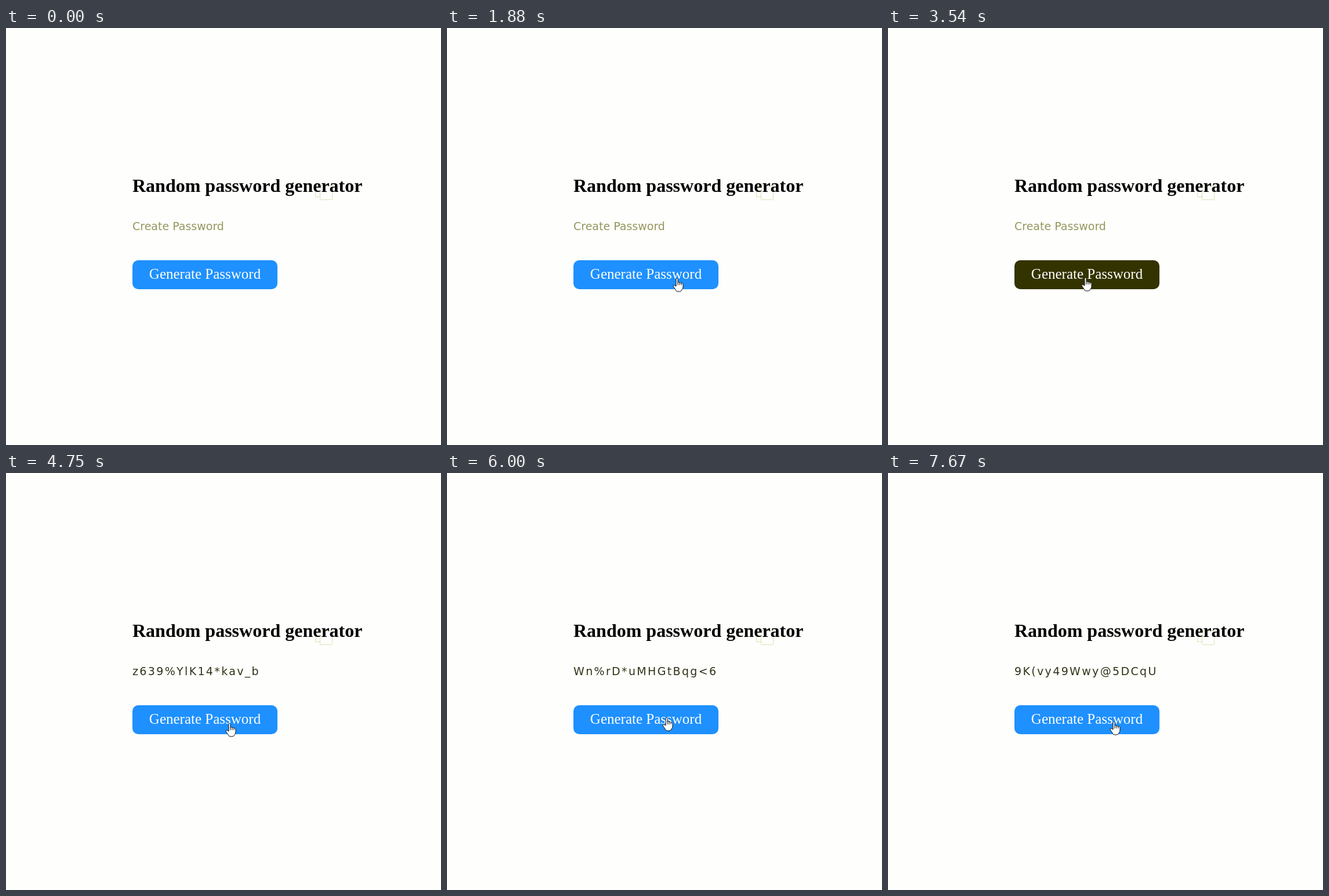
An HTML page that plays this animation: 750x720 px, repeating every 8 s.

```html
<!DOCTYPE html>
<html lang="en">
<head>
<meta charset="utf-8">
<title>Random password generator</title>
<style>
  html, body { margin: 0; width: 100%; height: 100%; overflow: hidden; background: #fefefc; }
  svg { display: block; width: 100%; height: 100%; }
  .title { font: bold 32px "Liberation Serif", "Times New Roman", serif; }
  .label { font: 25px "Liberation Serif", "Times New Roman", serif; text-anchor: middle; }
  #field { font: 19px "DejaVu Sans", Verdana, sans-serif; fill: #96965f; }
  #field.filled { fill: #333318; letter-spacing: 2.35px; }
  .ghost { fill: none; stroke: #e0e0b4; }
  .cursor { fill: #fff; stroke: #111; stroke-linejoin: round; }
</style>
</head>
<body>
<svg viewBox="0 0 750 720">
  <rect width="750" height="720" fill="#fefefc"/>
  <g class="ghost">
    <path d="M541 281.5H533.5V291.5H541"/>
    <rect x="541.5" y="272.5" width="21" height="24" rx="1"/>
  </g>
  <text class="title" x="218" y="283">Random password generator</text>
  <text id="field" x="218" y="349"></text>
  <rect id="button" x="218" y="401" width="250" height="50" rx="10"/>
  <text class="label" x="343" y="433" fill="#fffffa">Generate Password</text>
  <g id="pointer" class="cursor">
    <path id="arrow" d="M0 0V16.5L4 13L6 19L9 18L6 12H11.5Z"/>
    <g id="hand">
      <path d="M-2 14V1.5Q-.5-1.5 1 1.5V8Q2.5 5.500 4 8Q5.500 6 7 9Q10 7.500 10 11V15Q10 18 8 20
               Q7 23 4 23H1Q-2 23 -3 20Q-4 18 -7 14Q-7 10 -2 14Z"/>
      <path fill="none" d="M1 8V12M4 8V12M7 9V12"/>
    </g>
  </g>
</svg>
<script>
const LOOP = 8000, ENTER = 250, HOP = 700, PRESS = 120;
const $ = id => document.getElementById(id);
const [field, button, pointer, arrow, hand] =
  ['field', 'button', 'pointer', 'arrow', 'hand'].map($);

// Where the pointer arrives, and the password made if it presses there
const start = { x: 84, y: 512 };
const stops = [
  { at: 1040, x: 300, y: 484 },
  { at: 1880, x: 397, y: 432 },
  { at: 2590, x: 350, y: 462 },
  { at: 3500, x: 341, y: 431, word: 'z639%YlK14*kav_b' },
  { at: 4740, x: 386, y: 432 },
  { at: 5380, x: 371, y: 418, word: 'Wn%rD*uMHGtBqg<6' },
  { at: 6400, x: 390, y: 429, word: '1*QY6_iz#qeqOp_u' },
  { at: 7340, x: 390, y: 429, word: '9K(vy49Wwy@5DCqU' }
];
const clicks = stops.filter(s => s.word);

function ease(u) {
  u = Math.min(1, Math.max(0, u));
  return u * u * (3 - 2 * u);
}

function pointAt(t) {
  let { x, y } = start;
  for (const s of stops) {
    const e = ease((t - s.at) / HOP + 1);
    x += (s.x - x) * e;
    y += (s.y - y) * e;
  }
  return [Math.round(x), Math.round(y)];
}

function show(node, on) {
  node.setAttribute('visibility', on ? 'visible' : 'hidden');
}

function draw(t) {
  const made = clicks.filter(c => t >= c.at + PRESS).pop();
  field.textContent = made ? made.word : 'Create Password';
  field.classList.toggle('filled', Boolean(made));

  const pressed = clicks.some(c => t >= c.at && t < c.at + PRESS);
  button.setAttribute('fill', pressed ? '#333300' : '#1e90ff');

  const [x, y] = pointAt(t);
  const over = x >= 218 && x < 468 && y >= 401 && y < 451;
  pointer.setAttribute('transform', `translate(${x} ${y})`);
  show(arrow, t >= ENTER && !over);
  show(hand, t >= ENTER && over);
}

function tick() {
  draw(performance.now() % LOOP);
  requestAnimationFrame(tick);
}
tick();
</script>
</body>
</html>
```
